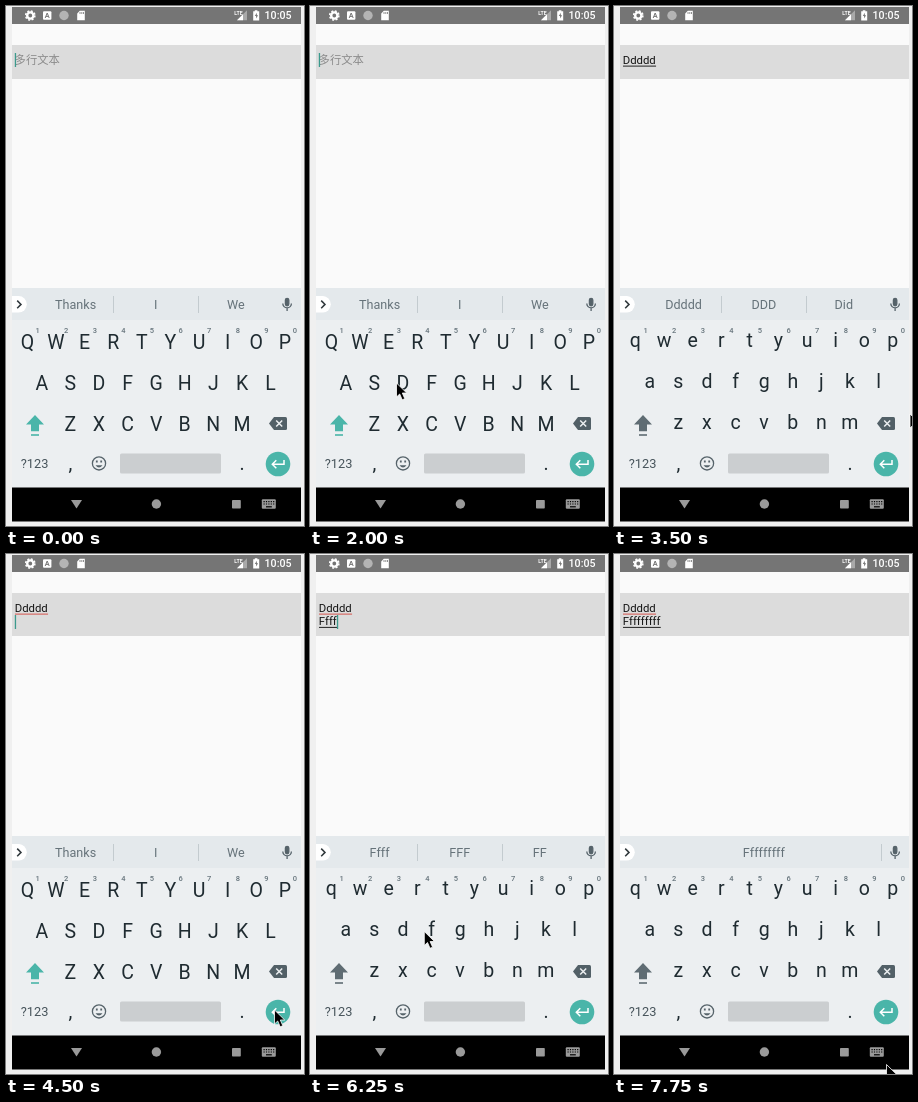
Animation, 298 px wide and 520 px high, one loop 8000 ms. Source, as an HTML page:

```html
<!DOCTYPE html>
<html lang="en">
<head>
<meta charset="utf-8">
<title>Multi-line input</title>
<style>
  html, body { margin: 0; width: 100%; height: 100%; overflow: hidden; background: #f0f0f0; }
  svg { display: block; width: 100vw; height: 100vh; }
  text { font-family: Roboto, "Noto Sans CJK SC", "Noto Sans CJK", sans-serif; white-space: pre; }
  .mid { text-anchor: middle; }
  .key { font-size: 19.5px; fill: #1f2b31; }
  .hint { font-size: 7.5px; font-weight: 500; fill: #66747c; }
  .word { font-size: 12.6px; fill: #66737a; }
  .typed { font-size: 11.35px; fill: #151515; }
</style>
</head>
<body>
<svg id="stage" viewBox="0 0 298 520">
  <rect width="298" height="520" fill="#f0f0f0"/>
  <rect x="6" y="1" width="289" height="482" fill="#fafafa"/>

  <!-- status bar -->
  <rect x="6" y="1" width="289" height="17" fill="#757575"/>
  <g fill="#fff">
    <circle cx="24.3" cy="9.5" r="3.1" fill="none" stroke="#fff" stroke-width="2.4"/>
    <circle cx="24.3" cy="9.5" r="4.6" fill="none" stroke="#fff" stroke-width="1.5" stroke-dasharray="2 1.61"/>
    <rect x="37" y="5.2" width="8.4" height="8.6" rx="1"/>
    <path d="M39.2 12 41.2 7l2 5M40 10.4h2.4" fill="none" stroke="#757575"/>
    <circle cx="58" cy="9.5" r="4.7" fill="#b4b4b4"/>
    <path d="M73.8 4.8h5v9.4h-7.6V7.4z"/>
    <path d="M74 6v2M75.8 6v2M77.5 6v2" stroke="#757575" stroke-width=".8"/>
    <text x="228.2" y="8.6" font-size="5.2" font-weight="700">LTE</text>
    <path d="M231 14.2 241 4.2v10z" fill="#a9a9a9"/>
    <path d="M231 14.2 237 8.2v6z"/>
    <path d="M248.8 4.2h2.6v1h1.8v9.2h-6V5.2h1.6z"/>
    <path d="m250.8 6.8-2 3.2h1.3v2.6l2-3.4h-1.3z" fill="#757575"/>
    <text x="258.6" y="13.2" font-size="10.6" font-weight="500">10:05</text>
  </g>

  <!-- text field -->
  <rect id="field" x="6" y="39" width="289" height="34" fill="#dcdcdc"/>
  <text id="holder" x="8.6" y="58" font-size="11.35" fill="#8b8b8b">多行文本</text>
  <text id="line0" class="typed" x="8.7" y="58"></text>
  <text id="line1" class="typed" x="8.7" y="71.3"></text>
  <rect id="under0" x="9" y="59.6" height="1"/>
  <rect id="under1" x="9" y="72.9" height="1" fill="#222"/>
  <rect id="caret" width="1.3" height="14" fill="#3c9a8d"/>

  <!-- keyboard -->
  <rect x="6" y="282" width="289" height="32" fill="#e4e9ec"/>
  <rect x="6" y="314" width="289" height="168" fill="#eceff1"/>
  <path d="M6 290h6.5a8.3 8.3 0 0 1 0 16.6H6z" fill="#fff"/>
  <path d="m11.2 294.6 3.8 3.8-3.8 3.8" fill="none" stroke="#30383c" stroke-width="1.5"/>
  <g id="words"></g>
  <path id="bars" stroke="#c3cbcf"/>
  <g fill="none" stroke="#56636a" stroke-width="1.3">
    <rect x="279.4" y="292.4" width="3.4" height="7.4" rx="1.7" fill="#56636a"/>
    <path d="M276.8 297.6a4.3 4.3 0 0 0 8.6 0M281.1 302v3"/>
  </g>
  <g id="keys"></g>
  <g id="shift">
    <path d="m29 409-9 9.4h5v6.8h8v-6.8h5z"/>
    <rect x="25" y="428.2" width="8" height="1.6"/>
  </g>
  <path d="M268 411h11.5q1.5 0 1.5 1.5v10q0 1.5-1.5 1.5H268l-5-6.5z" fill="#526067"/>
  <path d="m270.2 414.5 6 6m0-6-6 6" stroke="#eceff1" stroke-width="1.5"/>
  <text x="14.8" y="462.3" font-size="12.8" fill="#46535a">?123</text>
  <text class="key mid" x="64.5" y="463.5">,</text>
  <text class="key mid" x="236" y="463.5">.</text>
  <g fill="none" stroke="#56636a" stroke-width="1.3">
    <circle cx="93" cy="457.4" r="6.6"/>
    <path d="M89.5 459.2q3.5 4.6 7 0z" fill="#56636a" stroke="none"/>
    <path d="M89.9 455.5h1.8M94.3 455.5h1.8" stroke-width="1.8"/>
  </g>
  <rect x="114" y="447.5" width="101" height="20" rx="1.5" fill="#cbced0"/>
  <circle cx="272" cy="458" r="12.3" fill="#4ab5a9"/>
  <path d="M278 454v4.2h-11.5m3.8-4-4 4 4 4" fill="none" stroke="#fff" stroke-width="1.5"/>

  <!-- navigation bar -->
  <rect x="6" y="481.5" width="289" height="34" fill="#000"/>
  <g fill="#9a9a9a">
    <path d="M65 494h11l-5.5 8.6z"/>
    <circle cx="150.4" cy="498" r="4.7"/>
    <rect x="226" y="494" width="8.8" height="8.6" rx=".8"/>
    <rect x="255.8" y="493.2" width="14" height="9.6" rx="1"/>
    <path d="M257.5 495.7h10.8M257.5 498h10.8" stroke="#000" stroke-width="1.2" stroke-dasharray="1.2 1.2"/>
    <path d="M260 500.8h5.8" stroke="#000" stroke-width="1.2"/>
  </g>

  <path id="mouse" d="M0 0v14l3.2-3 2.5 5.8 2.6-1.1-2.5-5.7h4.4z" fill="#000" stroke="#fff" stroke-width=".8"/>
</svg>
<script>
const $ = id => document.getElementById(id);
const STEP = 250, LOOP = 8000;

function addText(parent, cls, x, y, content) {
  const el = document.createElementNS("http://www.w3.org/2000/svg", "text");
  el.setAttribute("class", cls);
  el.setAttribute("x", x);
  el.setAttribute("y", y);
  el.textContent = content;
  parent.append(el);
  return el;
}

function set(el, attrs) {
  for (const name in attrs) el.setAttribute(name, attrs[name]);
}

const show = (el, on) => el.setAttribute("visibility", on ? "visible" : "hidden");

const rows = [["QWERTYUIOP", 21.4, 343], ["ASDFGHJKL", 35.8, 384], ["ZXCVBNM", 64.3, 425]];
const keys = [];
rows.forEach(([letters, x0, y], row) => [...letters].forEach((upper, i) => {
  const x = x0 + i * 28.6;
  keys.push({ upper, y, el: addText($("keys"), "key mid", x, y, upper) });
  if (row === 0) addText($("keys"), "hint mid", x + 10.2, 326.6, (i + 1) % 10);
}));
const words = [69.6, 149.8, 229.8].map(x => addText($("words"), "word mid", x, 303, ""));

// [start time, number of letters]
const firstLine = [[0, 0], [2250, 1], [2500, 3], [2750, 4], [3000, 5]];
const secondLine = [[0, 0], [5750, 1], [6000, 3], [6250, 4], [6500, 5], [6750, 7], [7000, 8], [7250, 9]];
// [start time, x, y]
const mousePath = [
  [0, -50, 0], [1500, 127, 361], [1750, 86.5, 377], [3250, 196, 396], [3500, 296, 408],
  [3750, 285, 436], [4000, 268.5, 456], [5000, 188, 414], [5250, 114.3, 377.5],
  [7500, 205, 452], [7750, 272.5, 510.5]
];
const NEWLINE = 4250;
const edits = [0, ...firstLine.slice(1).map(e => e[0]), NEWLINE, ...secondLine.slice(1).map(e => e[0])];

const latest = (list, t) => list.filter(e => e[0] <= t).pop();
const spell = (letter, n) => n ? letter + letter.toLowerCase().repeat(n - 1) : "";
const lineWidth = (n, first, rest) => n ? (first + (n - 1) * rest) * 11.35 : 0;

function suggestions(t, a, b) {
  if (t >= NEWLINE) {
    if (!b) return ["Thanks", "I", "We"];
    return b.length > 6 ? ["", b, ""] : [b, "FFF", "FF"];
  }
  return a ? [a, "DDD", "Did"] : ["Thanks", "I", "We"];
}

function draw(time) {
  const t = Math.floor(time % LOOP / STEP) * STEP;
  const nA = latest(firstLine, t)[1], nB = latest(secondLine, t)[1];
  const a = spell("D", nA), b = spell("F", nB);
  const wA = lineWidth(nA, .656, .564), wB = lineWidth(nB, .553, .347);
  const broken = t >= NEWLINE;

  set($("field"), { height: broken ? 43 : 34 });
  show($("holder"), !nA);
  $("line0").textContent = a;
  $("line1").textContent = b;
  set($("under0"), { width: wA, fill: broken ? "#d5554f" : "#222" });
  set($("under1"), { width: wB });

  const since = t - edits.filter(e => e <= t).pop();
  show($("caret"), since % 1000 < 500);
  set($("caret"), { x: 8.8 + (broken ? wB : wA), y: broken ? 61 : 47 });

  const caps = broken ? !nB : !nA;
  for (const { el, upper, y } of keys) {
    el.textContent = caps ? upper : upper.toLowerCase();
    set(el, { y: caps ? y : y - 2 });
  }
  set($("shift"), { fill: caps ? "#4ab5a9" : "#5f6c73" });

  const list = suggestions(t, a, b);
  words.forEach((el, i) => el.textContent = list[i]);
  set($("bars"), { d: list[0] ? "M107.5 290v17M192.5 290v17" : "M267.5 290v17" });

  const [, x, y] = latest(mousePath, t);
  set($("mouse"), { transform: `translate(${x} ${y})` });
}

const start = performance.now();
function tick() {
  draw(performance.now() - start);
  requestAnimationFrame(tick);
}
tick();
</script>
</body>
</html>
```
